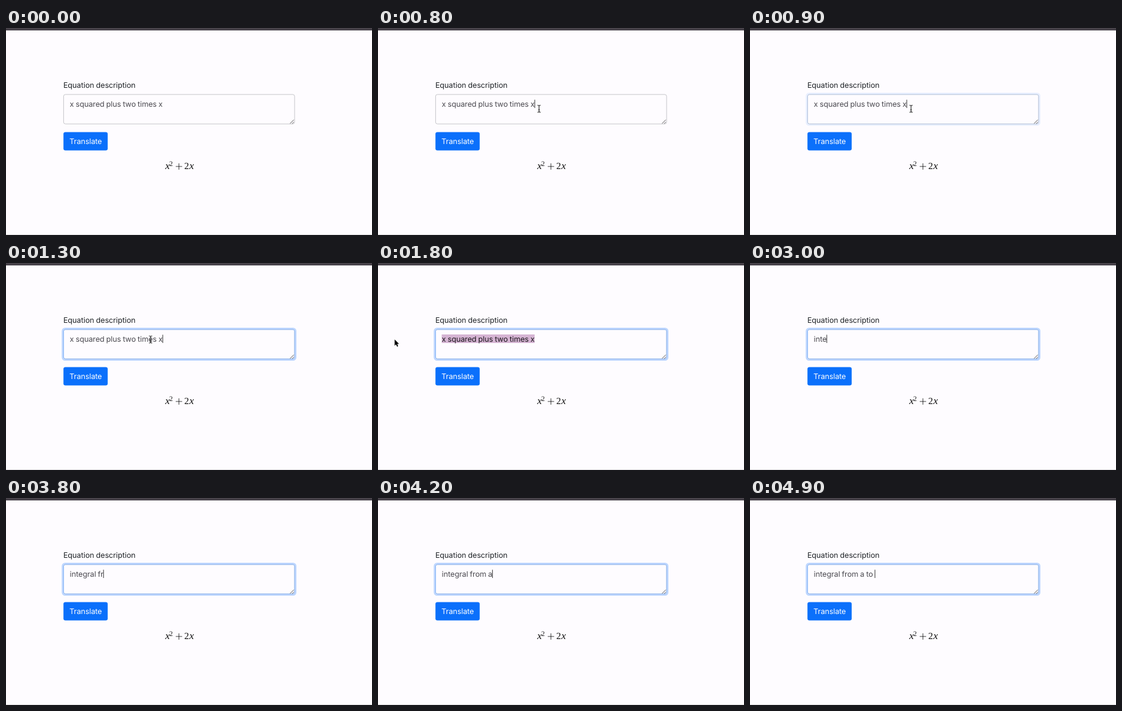
Write an HTML page that moves like this. It is 600 by 339 pixels and loops after 5 s.

```html
<!DOCTYPE html>
<html lang="en">
<head>
<meta charset="utf-8">
<title>Equation translator</title>
<style>
  html, body { margin: 0; height: 100%; overflow: hidden; background: #fefcff; }
  svg { display: block; }
  text { white-space: pre; text-rendering: geometricPrecision; }
  .ui { font: 12.4px Inter, sans-serif; letter-spacing: -.08px; word-spacing: -.4px; fill: #212529; }
  .math { font: 15.5px "Liberation Serif", serif; fill: #111; }
  .var { font-size: 17px; font-style: italic; }
  .sup { font-size: 11.3px; }
</style>
</head>
<body>
<svg width="600" height="339" viewBox="0 0 600 339">
  <rect width="600" height="4" fill="#48434a"/>
  <rect y="338" width="600" height="1" fill="#dedce0"/>

  <text class="ui" x="94" y="97.5">Equation description</text>
  <rect id="ring" x="92.7" y="107.2" width="382.1" height="51.6" rx="4.2" fill="none" stroke="#0d6efd" stroke-opacity=".27" stroke-width="2.6"/>
  <rect x="94.4" y="108.9" width="378.7" height="48.2" rx="3" fill="#fefcff" stroke="#c6c6ca"/>
  <rect id="border" x="94.4" y="108.9" width="378.7" height="48.2" rx="3" fill="none" stroke="#86b7fe"/>
  <path d="M465.8 156.4l6-6M469.2 156.6l2.6-2.6" stroke="#444" stroke-width=".9"/>
  <rect id="highlight" y="117" height="14" fill="#d5b4d3"/>
  <text id="field" class="ui" x="104.5" y="128.5" xml:space="preserve"><tspan id="plain" fill="#4b4a50"></tspan><tspan id="marked" fill="#1c171d"></tspan></text>
  <rect id="caret" y="117.5" width="1" height="13.5" fill="#333"/>

  <rect x="94.2" y="170.4" width="72.5" height="30" rx="3.2" fill="#0b70fb"/>
  <text class="ui" x="130.7" y="190" text-anchor="middle" style="fill:#fff">Translate</text>

  <g class="math">
    <text class="var" x="261" y="231">x</text>
    <text class="sup" x="267.8" y="226">2</text>
    <path d="M278.3 226.8h10.4M283.5 221.6v10.4" stroke="#111" stroke-width=".8"/>
    <text x="292.3" y="231">2</text>
    <text class="var" x="300.4" y="231">x</text>
  </g>

  <path id="arrow" d="M0 0V10.2L2.3 8.1L3.9 11.9L5.7 11.1L4.1 7.4H7.2Z" fill="#000" stroke="#fff" stroke-width=".8" paint-order="stroke"/>
  <path id="beam" d="M-2.6-5.5Q0-5.5 0-4Q0-5.5 2.6-5.5M0-4V4.5M-2.6 6Q0 6 0 4.5Q0 6 2.6 6M-1.3 2H1.3" fill="none" stroke="#222" stroke-width="1.1"/>
</svg>
<script>
const LOOP = 5000, STEP = 100, LEFT = 104.5;
const OLD_TEXT = 'x squared plus two times x';
const NEW_TEXT = 'integral from a to ';
const KEY_TIMES = [2600, 2700, 2900, 3000, 3200, 3300, 3400, 3500, 3600, 3700,
  3800, 3900, 4000, 4100, 4200, 4300, 4300, 4800, 4900];
// Pointer stops: time, x, y
const STOPS = [
  [200, 223, 219], [400, 228, 196], [500, 243, 163], [600, 256, 140], [700, 263, 133],
  [800, 264, 132], [1300, 237, 125], [1400, 174, 125], [1500, 90, 125], [1600, 27.3, 125.2]
];
const $ = id => document.getElementById(id);
const show = (el, on) => el.setAttribute('visibility', on ? 'visible' : 'hidden');

function drawPointer(t) {
  const stop = t < 2600 && STOPS.findLast(s => s[0] <= t);
  const overField = stop && stop[1] > 94 && stop[2] < 157;
  const dragging = t >= 1300 && t < 1600;
  const beam = overField || dragging;
  show($('arrow'), stop && !beam);
  show($('beam'), stop && beam);
  if (stop) $(beam ? 'beam' : 'arrow').setAttribute('transform', `translate(${stop[1]} ${stop[2]})`);
  return stop ? stop[1] : 0;
}

function drawField(t, pointerX) {
  const typed = KEY_TIMES.filter(k => k <= t).length;
  const text = typed ? NEW_TEXT.slice(0, typed) : OLD_TEXT;
  const selecting = t >= 1400 && t < 2600;
  $('plain').textContent = text;
  $('marked').textContent = '';
  const end = LEFT + $('field').getComputedTextLength();
  let from = end;
  if (selecting) {
    const first = [...text].findIndex((_, i) => $('field').getEndPositionOfChar(i).x > pointerX);
    from = $('field').getStartPositionOfChar(first).x;
    $('plain').textContent = text.slice(0, first);
    $('marked').textContent = text.slice(first);
  }
  $('highlight').setAttribute('x', from);
  $('highlight').setAttribute('width', end - from);
  $('caret').setAttribute('x', end - .3);
  show($('caret'), t >= 800 && !selecting);
}

function draw() {
  const t = Math.floor(performance.now() % LOOP / STEP) * STEP;
  const focus = Math.min(1, Math.max(0, (t - 800) / 300));
  $('ring').setAttribute('opacity', focus);
  $('border').setAttribute('opacity', focus);
  drawField(t, drawPointer(t));
  requestAnimationFrame(draw);
}
draw();
</script>
</body>
</html>
```
